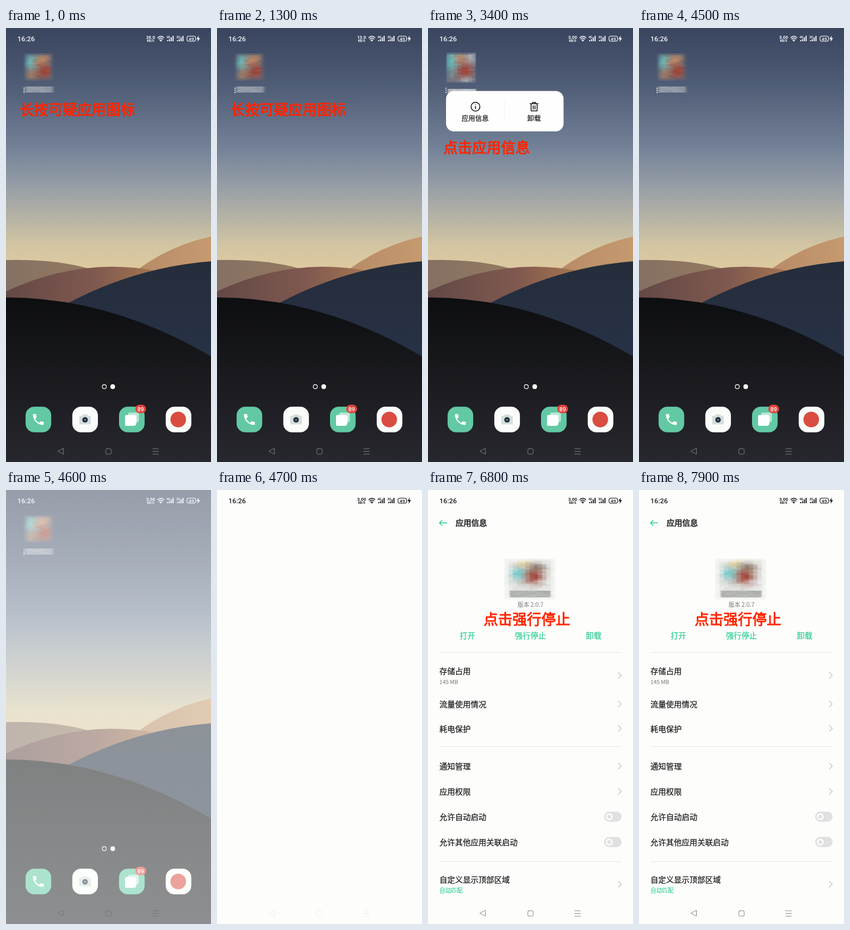
An HTML page that plays this animation: 341 by 720 pixels, repeating every 8 s.

```html
<!DOCTYPE html>
<html lang="zh-CN">
<head>
<meta charset="utf-8">
<title>应用信息</title>
<style>
  html, body { margin: 0; width: 100%; height: 100%; overflow: hidden; background: #fdfefc; }
  svg { display: block; width: 100vw; height: 100vh; }
  text {
    --ink: #1c1c1c;
    font-family: "Noto Sans CJK SC", "Noto Sans CJK", sans-serif; font-size: 13px;
    fill: var(--ink); stroke: var(--ink); stroke-width: .25px; stroke-linejoin: round;
  }
  .latin { --ink: currentColor; font-family: Roboto, sans-serif; font-weight: 500; stroke: none; }
  .mid { text-anchor: middle; }
  .title { stroke-width: .55px; }
  .caption { --ink: #ff2400; font-size: 24px; stroke-width: .9px; }
  .small { --ink: #858585; font-size: 9.7px; stroke-width: .1px; }
  .green { --ink: #2fce93; }
  .line { fill: none; stroke: currentColor; stroke-linecap: round; stroke-linejoin: round; }
</style>
</head>
<body>
<svg viewBox="0 0 341 720" preserveAspectRatio="none">
  <defs>
    <linearGradient id="sky" gradientUnits="userSpaceOnUse" x1="0" y1="0" x2="0" y2="400">
      <stop stop-color="#39445e"/>
      <stop offset=".25" stop-color="#515e77"/>
      <stop offset=".5" stop-color="#748298"/>
      <stop offset=".65" stop-color="#959da6"/>
      <stop offset=".8" stop-color="#b9b5a5"/>
      <stop offset=".9" stop-color="#d2c5a3"/>
      <stop offset="1" stop-color="#deca9f"/>
    </linearGradient>
    <linearGradient id="tan"><stop stop-color="#b78b67"/><stop offset="1" stop-color="#c69a6f"/></linearGradient>
    <linearGradient id="olive"><stop stop-color="#857063"/><stop offset="1" stop-color="#93795f"/></linearGradient>
    <linearGradient id="brown"><stop stop-color="#634846"/><stop offset=".6" stop-color="#80594f"/><stop offset="1" stop-color="#a57651"/></linearGradient>
    <linearGradient id="navy" x2="0" y2="1"><stop stop-color="#252d3b"/><stop offset="1" stop-color="#273247"/></linearGradient>
    <linearGradient id="coal" x2="0" y2="1"><stop stop-color="#0d0e10"/><stop offset="1" stop-color="#27272e"/></linearGradient>
    <filter id="smear"><feGaussianBlur stdDeviation="2 .7"/></filter>
    <filter id="crisp"><feGaussianBlur stdDeviation="1.2 .6"/></filter>
  </defs>

  <g id="home">
    <path fill="url(#sky)" d="M0 0H341V720H0z"/>
    <path fill="url(#tan)" d="M220 400Q275 360 341 346V440H220z"/>
    <path fill="url(#olive)" d="M0 385Q80 383 137 399V450H0z"/>
    <path fill="url(#brown)" d="M0 437Q85 397 175 396Q215 396 250 403L104 470H0z"/>
    <path fill="url(#navy)" d="M102 457Q215 397 341 387V560H102z"/>
    <path fill="url(#coal)" d="M0 447Q175 447 341 545V720H0z"/>

    <g id="icon" filter="url(#smear)"></g>
    <g id="iconLifted" filter="url(#crisp)"></g>
    <path stroke="#e8eaee" stroke-width="1.500" stroke-dasharray="2 1.500" d="M30 99V108"/>

    <circle cx="163.500" cy="595" r="3.400" fill="none" stroke="#fff" stroke-width="1.100"/>
    <circle cx="177.500" cy="595" r="3.900" fill="#fff"/>

    <g id="tiles"></g>
    <path fill="#fff" transform="translate(41.800 637.500)" d="M6.620 10.800c1.440 2.830 3.760 5.140 6.590 6.590l2.200-2.200q.5-.4 1-.24 1.700.57 3.600.57 1 0 1 1V20q0 1-1 1C10.600 21 3 13.400 3 4q0-1 1-1h3.500q1 0 1 1 0 1.900.57 3.600.16.500-.25 1z"/>
    <path fill="#d3dedd" d="M122 643.500h4l2-2.500h7l2 2.500h4v14h-19z"/>
    <circle cx="131.500" cy="650" r="4.600" fill="#23303b"/>
    <circle cx="131.500" cy="650" r="1.600" fill="#6d8aa0"/>
    <rect x="203" y="638" width="18" height="16" rx="3" fill="#b9e8d6"/>
    <path fill="#fff" d="M200 642h14q3 0 3 3v10q0 5-5 5h-12q-2 0-2-2v-13q0-3 2-3z"/>
    <rect x="215" y="625" width="18" height="14" rx="7" fill="#e2443b"/>
    <text class="latin mid" x="224" y="635.500" style="font-size:9.500px;fill:#fff">89</text>
    <circle cx="286.500" cy="649.500" r="13" fill="#d94c40"/>

    <text id="hint1" class="caption" x="22.500" y="144">长按可疑应用图标</text>
    <g id="popup">
      <rect x="30" y="104.500" width="195.500" height="67" rx="13" fill="#fefefe"/>
      <path stroke="#f4f4f4" d="M127.500 120V155"/>
      <g class="line" color="#1c1c1c" stroke-width="1.500">
        <circle cx="79" cy="130.500" r="7.300"/>
        <path d="M79 130V134M79 127v.1M170 125.500H183M174 125.500V123.500H179V125.500M171.500 126V137.500H181.500V126M175 129V134.500M178 129V134.500"/>
      </g>
      <text class="mid" x="78.500" y="154" style="font-size:11.200px">应用信息</text>
      <text class="mid" x="176.500" y="154" style="font-size:11.200px">卸载</text>
    </g>
    <text id="hint2" class="caption" x="25.500" y="207">点击应用信息</text>
  </g>

  <path id="sheet" fill="#fdfefc" d="M0 0H341V720H0z"/>

  <g id="details">
    <path class="line" color="#2fce93" stroke-width="1.400" d="M31 54.500H19M23.500 50L19 54.500L23.500 59"/>
    <text class="title" x="46" y="59">应用信息</text>
    <g id="appArt" filter="url(#crisp)"></g>
    <text class="small mid" x="170.500" y="194">版本 2.0.7</text>
    <text class="green mid" x="65.500" y="245.500">打开</text>
    <text class="green mid" x="170.500" y="245.500">强行停止</text>
    <text class="green mid" x="275.500" y="245.500">卸载</text>
    <path stroke="#e7e8e6" d="M19 269.500H322M19 425.500H322M19 616.500H322"/>
    <g id="rows"></g>
    <text class="small" x="19" y="321.500" style="font-size:9.300px">145 MB</text>
    <text class="small green" x="19" y="668">自动匹配</text>
    <text id="hint3" class="caption" x="92.500" y="223">点击强行停止</text>
  </g>

  <g id="status">
    <text class="latin" x="19" y="22" style="font-size:11.400px">16:26</text>
    <text id="speed" class="latin mid" x="240.500" y="17.800" style="font-size:7.300px;font-weight:700"></text>
    <text class="latin mid" x="240.500" y="23.300" style="font-size:5.400px;font-weight:700">KB/S</text>
    <path class="line" stroke-width="1.400" d="M252.500 16Q257.500 11.500 262.500 16M254.200 18.300Q257.500 15.400 260.800 18.300M256 20.300Q257.500 19 259 20.300"/>
    <circle cx="257.500" cy="21.600" r="1" fill="currentColor"/>
    <g id="signals"></g>
    <rect class="line" x="301" y="13.500" width="14.500" height="8.500" rx="3.500" stroke-width="1.100"/>
    <text class="latin mid" x="308.200" y="20.700" style="font-size:8px">49</text>
    <path fill="currentColor" d="M320.500 12.500L316.800 18.500H319.300L318.600 23L322.800 16.700H320.200z"/>
  </g>

  <g id="nav" class="line" stroke-width="1">
    <path d="M95.500 697.500V707L86.500 702.300zM244 698H253.500M244 702.500H253.500M244 707H253.500"/>
    <rect x="166" y="698" width="9" height="9" rx="2"/>
  </g>
</svg>
<script>
const LOOP = 8000;
const el = id => document.getElementById(id);

function randomizer(seed) {
  return () => (seed = seed * 16807 % 2147483647) / 2147483647;
}

// Rows of short smears, tinted by soft colour spots [x, y, radius, rgb] in 0..1 space.
// A larger `soft` lets the patch fade out further from its edges.
function mosaic(id, x, y, w, h, base, spots, seed, cell, soft) {
  const rnd = randomizer(seed);
  let out = '';
  for (let j = 0; j < h; j += 3) {
    const shift = (rnd() - .5) * .12;
    for (let i = 0; i < w; i += cell) {
      const u = (i + cell / 2) / w, v = (j + 1.5) / h;
      let rgb = base;
      for (const [sx, sy, r, tint] of spots) {
        const d = Math.hypot(u + shift - sx, v - sy) / r;
        const k = Math.exp(-d * d);
        rgb = rgb.map((c, n) => c + (tint[n] - c) * k);
      }
      const light = (rnd() - .5) * 14;
      const edge = Math.max(0, Math.min(u, 1 - u, v, 1 - v));
      const alpha = soft ? Math.min(1, .25 + edge / soft) : 1;
      const cw = Math.min(cell, w - i) + .1, ch = Math.min(3, h - j) + .1;
      out += `<rect x="${x + i}" y="${y + j}" width="${cw}" height="${ch}" fill-opacity="${alpha}" fill="rgb(${rgb.map(c => Math.round(Math.max(0, Math.min(255, c + light))))})"/>`;
    }
  }
  el(id).innerHTML += out;
}

const TEAL = [104, 190, 188], RED = [160, 64, 50], ORANGE = [190, 134, 100], PALE = [176, 182, 192];
mosaic('icon', 32, 42, 46, 45, [108, 110, 118],
  [[.15, .35, .32, TEAL], [.6, .25, .25, ORANGE], [.25, .8, .25, [160, 124, 104]], [.7, .66, .26, RED]], 11, 6, .15);
mosaic('icon', 32, 97, 46, 10, [146, 154, 168], [], 5, 8, 0);
mosaic('iconLifted', 31, 41, 48, 50, [122, 124, 134],
  [[.12, .3, .34, TEAL], [.5, .2, .2, ORANGE], [.9, .15, .25, PALE], [.64, .62, .28, RED], [.7, 1, .2, PALE]], 23, 6, .12);
mosaic('iconLifted', 33, 101, 47, 8, [182, 186, 194], [], 9, 7, 0);
mosaic('appArt', 127, 114, 84, 68, [230, 232, 230],
  [[.5, .36, .3, [186, 180, 174]], [.3, .36, .15, [120, 208, 208]], [.38, .1, .12, [230, 212, 150]],
   [.62, .24, .16, [146, 134, 122]], [.6, .44, .16, [166, 72, 60]]], 31, 7, .2);
mosaic('appArt', 136, 167, 68, 11, [180, 182, 180], [], 3, 9, 0);

el('tiles').innerHTML = ['#62c9a4', '#fafcfa', '#62c9a4', '#fafcfa'].map((fill, i) =>
  `<rect x="${32.6 + i * 77.7}" y="628.200" width="42.600" height="42.600" rx="14.500" fill="${fill}"/>`).join('');

el('signals').innerHTML = [['4G', 267], ['2G', 283.5]].map(([label, x]) =>
  `<text class="latin" x="${x}" y="17" style="font-size:5px;font-weight:700">${label}</text>` +
  [2, 3.5, 6.5, 9].map((h, i) =>
    `<rect x="${x + 1 + i * 3}" y="${22 - h}" width="1.800" height="${h}" fill="currentColor"/>`).join('')).join('');

const chevron = y => `<path class="line" color="#c3c5c3" stroke-width="1.100" d="M316.500 ${y - 5}L321.500 ${y}L316.500 ${y + 5}"/>`;
const toggle = y => `<rect x="293" y="${y - 8.5}" width="29" height="17" rx="8.500" fill="#dfe0df"/>
  <circle cx="301.500" cy="${y}" r="4.500" fill="none" stroke="#fff" stroke-width="2.400"/>`;
el('rows').innerHTML = [
  ['存储占用', 300, chevron, 307.5], ['流量使用情况', 355.5, chevron, 355], ['耗电保护', 396, chevron, 395.5],
  ['通知管理', 458.5, chevron, 458], ['应用权限', 500.5, chevron, 500],
  ['允许自动启动', 542.5, toggle, 542], ['允许其他应用关联启动', 584.5, toggle, 584],
  ['自定义显示顶部区域', 646.5, chevron, 654]
].map(([label, y, control, cy]) => `<text x="19" y="${y + 4.8}">${label}</text>` + control(cy)).join('');

const ramp = (t, from, to) => Math.max(0, Math.min(1, (t - from) / (to - from)));
const fade = (id, alpha) => {
  el(id).style.opacity = alpha;
  el(id).style.display = alpha > 0 ? '' : 'none';
};

function render(t) {
  const grow = 1 - (1 - ramp(t, 1650, 1900)) ** 3;
  const popup = ramp(t, 1650, 1800) * (1 - ramp(t, 4150, 4350));
  const scale = .6 + .4 * grow;
  const sheet = ramp(t, 4520, 4690);
  const page = ramp(t, 4950, 5100);

  fade('hint1', t < 1700 ? 1 : 0);
  fade('hint2', t >= 1900 && t < 4200 ? 1 : 0);
  fade('hint3', t >= 5300 ? 1 : 0);
  fade('popup', popup);
  fade('icon', 1 - popup);
  fade('iconLifted', popup);
  el('popup').setAttribute('transform', `translate(54 105) scale(${scale}) translate(-54 -105)`);
  fade('home', sheet < 1 ? 1 : 0);
  fade('sheet', sheet);
  fade('details', page);

  el('status').style.color = sheet > .5 ? '#1d1f1f' : '#f4f6f9';
  el('nav').style.color = sheet > .5 ? '#8d8f8e' : '#77787e';
  fade('nav', sheet > .5 ? .12 + .88 * page : 1);
  el('speed').textContent = t < 1000 ? '26.0' : t < 3000 ? '13.0' : '3.00';
}

function tick() {
  render(performance.now() % LOOP);
  requestAnimationFrame(tick);
}
tick();
</script>
</body>
</html>
```
